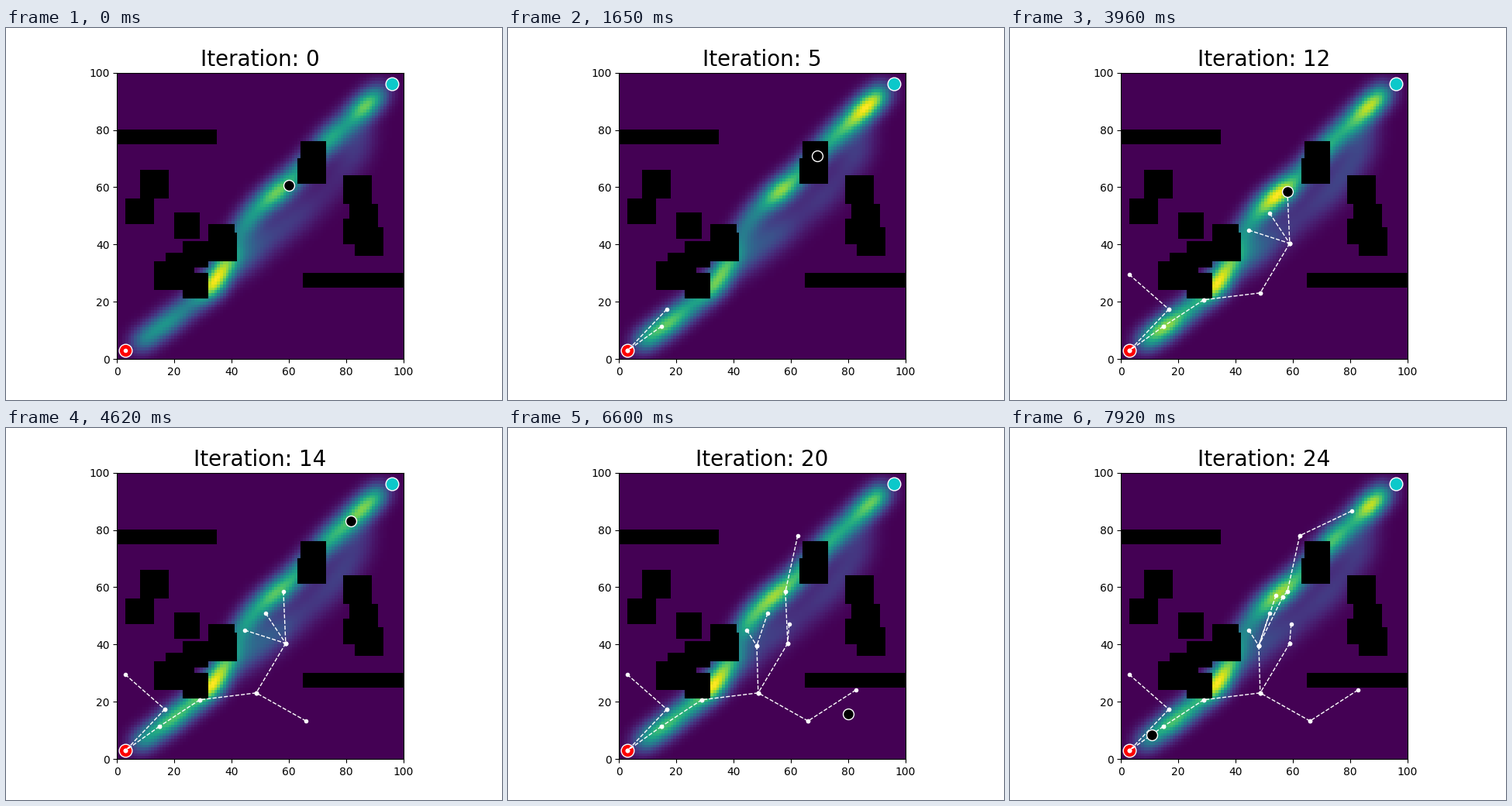
Animation, 640 px wide and 480 px high, one loop 8000 ms. Source, as a matplotlib script:

```python
import numpy as np
import matplotlib.pyplot as plt
from matplotlib.animation import FuncAnimation

LOOP, INTERVAL, STEP = 8000, 40, 330
ITERATIONS = 25
REACH = 20
START, GOAL = (3, 3), (96, 96)

# Lower left corners of the obstacles, grouped by width and height
BLOCKS = {
    (35, 5): [(0, 75), (65, 25)],
    (10, 10): [(8, 56), (13, 24), (17, 27), (32, 34), (79, 54), (81, 44),
               (83, 36)],
    (9, 9): [(20, 42), (23, 32), (32, 38), (23, 21), (64, 67)],
    (10, 9): [(3, 47), (63, 61), (79, 40)],
}

# Tree nodes: x, y, parent, iteration of birth
NODES = {
    "a": (16.7, 17.4, "root", 2), "b": (14.8, 11.4, "root", 4),
    "c": (2.9, 29.5, "a", 6), "d": (28.9, 20.7, "b", 7),
    "e": (48.6, 23.1, "d", 8), "f": (58.9, 40.4, "e", 9),
    "g": (51.9, 50.9, "f", 10), "h": (44.6, 45, "f", 11),
    "i": (58.1, 58.5, "f", 12), "j": (66, 13.3, "e", 13),
    "k": (48.1, 39.6, "e", 15), "l": (82.7, 24.1, "j", 16),
    "n": (62.4, 78, "i", 18), "m": (59.4, 47.1, "f", 19),
    "q": (56.5, 56.7, "k", 21), "o": (80.5, 86.6, "n", 22),
    "p": (54.1, 57.1, "k", 23),
}
REWIRED = {"g": "k", "h": "k", "i": "q"}
PLACE = {"root": START, **{n: v[:2] for n, v in NODES.items()}}

# Samples that did not simply become a node
SAMPLES = {0: (60, 60.6), 5: (69.2, 71), 9: (77.1, 80.1), 14: (81.6, 83.1),
           17: (97.3, 65.2), 20: (80, 15.7), 24: (10.8, 8.5)}

RIDGE = np.array([(7, 5), (20, 14.5), (33, 25), (36.5, 30.5), (43, 45),
                  (49, 52.5), (61, 62.5), (75, 77.5), (93, 94)])
BRANCH = np.array([(39, 32), (47, 38), (61, 48), (73, 58), (83, 71), (86, 82)])
# Bright and dim spots on the ridge: position along it, gain
SPOTS = [(.11, .2), (.275, .5), (.4, -.2), (.58, .25), (.8, .1), (.93, .35)]
CELLS = np.arange(100) + 0.5


def sample_at(k):
    if k in SAMPLES:
        return SAMPLES[k]
    for x, y, parent, birth in NODES.values():
        if birth == k:
            px, py = PLACE[parent]
            # A full-length edge was cut short on the way to its sample
            r = 1.5 if np.hypot(x - px, y - py) > REACH - 1 else 1
            return px + r * (x - px), py + r * (y - py)
    return np.random.default_rng(k).uniform(34, 44) * np.ones(2)


def band(path, level, sigma):
    """Glow along a polyline; level gives the crest for positions 0 to 1."""
    length = np.r_[0, np.cumsum(np.hypot(*np.diff(path, axis=0).T))]
    s = np.arange(0, length[-1], 0.5)
    x, y = (np.interp(s, length, v) for v in path.T)
    gx, gy = (np.exp(-((CELLS - v[:, None]) / sigma) ** 2 / 2) for v in (x, y))
    return (gy * level(s / length[-1])[:, None]).T @ gx / sigma


def heatmap(k):
    rng = np.random.default_rng(k)
    ridge_noise = rng.uniform(0.75, 1.25, 16)
    branch_noise = rng.uniform(0.6, 1.4, 8)

    def wobble(u, noise):
        return np.interp(u, np.linspace(0, 1, len(noise)), noise)

    def ridge(u):
        spots = sum(g * np.exp(-((u - c) / 0.05) ** 2) for c, g in SPOTS)
        return (0.55 + spots) * wobble(u, ridge_noise)

    def branch(u):
        return (0.15 + 0.2 * (1 - u) ** 3) * wobble(u, branch_noise)

    heat = band(RIDGE, ridge, 3.1)
    heat = heat / heat.max() + band(BRANCH, branch, 4) / 5
    return heat / heat.max()


blocked = np.zeros((100, 100), bool)
for (w, h), corners in BLOCKS.items():
    for x, y in corners:
        blocked[y:y + h, x:x + w] = True

HEAT = [np.ma.array(heatmap(k), mask=blocked) for k in range(ITERATIONS)]

fig, ax = plt.subplots(figsize=(6.4, 4.8), dpi=100)
cmap = plt.get_cmap("viridis").copy()
cmap.set_bad("black")
image = ax.imshow(HEAT[0], origin="lower", extent=(0, 100, 0, 100), cmap=cmap,
                  vmin=0, vmax=1, interpolation="nearest")


def disc(xy, color, size, z):
    return ax.plot([xy[0]], [xy[1]], "o", color=color, ms=size, mec="white",
                   mew=1, zorder=z)[0]


disc(START, "red", 12, 2)
disc(GOAL, "#0cc8ca", 12, 2)
tree, = ax.plot([], [], "--", color="white", lw=1, marker=".", ms=6, zorder=3)
sample = disc(START, "black", 10, 4)
title = ax.set_title("", fontsize=20)
ax.set_xlim(0, 100)
ax.set_ylim(0, 100)


def update(frame):
    k = min((frame * INTERVAL + INTERVAL - 1) // STEP, ITERATIONS - 1)
    gap = (np.nan, np.nan)
    points = [START, gap]
    for name, (x, y, parent, birth) in NODES.items():
        if birth <= k:
            better = REWIRED.get(name)
            if better and NODES[better][3] <= k:
                parent = better
            points += [(x, y), PLACE[parent], gap]
    x, y = sample_at(k)
    image.set_data(HEAT[k])
    tree.set_data(*np.array(points, float).T)
    sample.set_data([x], [y])
    title.set_text(f"Iteration: {k}")
    return image, tree, sample, title


anim = FuncAnimation(fig, update, frames=LOOP // INTERVAL, interval=INTERVAL,
                     repeat=True, repeat_delay=0, blit=False)
plt.show()
```
